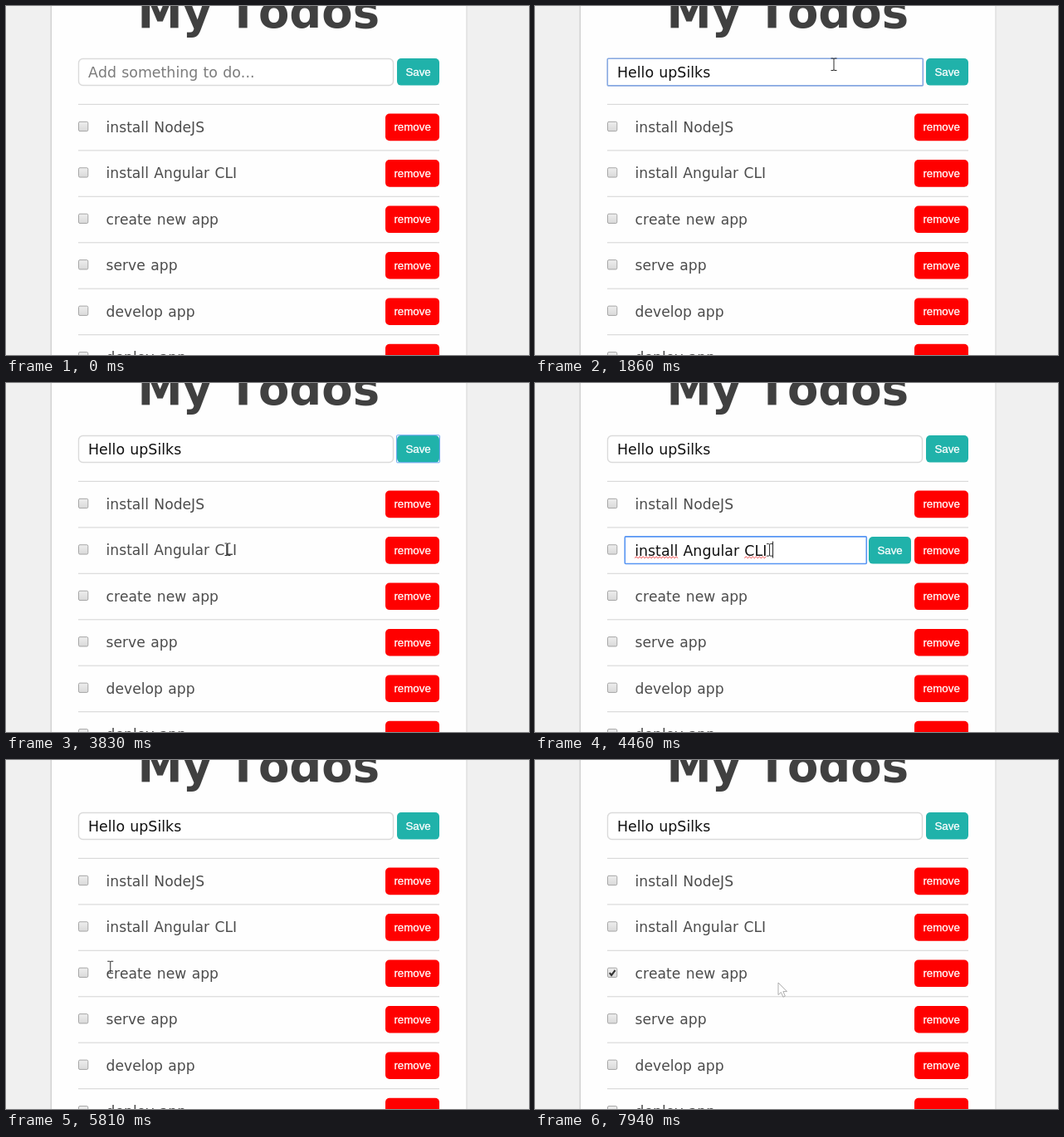
These frames come from a looping animation (630x420 px, 8 s). An HTML page:

```html
<!DOCTYPE html>
<html lang="en">
<head>
<meta charset="utf-8">
<title>My Todos</title>
<style>
  html, body { margin: 0; width: 100%; height: 100%; overflow: hidden; background: #f0f0f0; }
  svg { display: block; width: 630px; height: 420px; }
  text { white-space: pre; font: 17.4px "DejaVu Sans", sans-serif; word-spacing: .7px; font-kerning: none; }
  .title { font-size: 54.4px; font-weight: bold; word-spacing: 0; fill: #404040; }
  .item { font-size: 17.15px; word-spacing: 1px; fill: #4c4c4c; }
  .label { font: 13.33px "Liberation Sans", Arial, sans-serif; word-spacing: 0; fill: #fff; stroke: #fff; stroke-width: .3; }
  .value { fill: #111; }
  .hint { fill: #7c7c7c; }
  .squiggle { fill: none; stroke: #f03030; stroke-width: .9; }
</style>
</head>
<body>
<svg id="stage" viewBox="0 0 630 420"></svg>
<script>
const LOOP = 8000;
const ROW_TOP = 118, ROW_STEP = 55.45;
const ITEMS = ["install NodeJS", "install Angular CLI", "create new app", "serve app", "develop app", "deploy app"];
const GREETING = "Hello upSilks";
const CLICK = { input: 850, save: 2860, item: 3950, close: 5480, check: 6300 };

// time, x, y of the pointer
const PATH = [
  [20, 242, 302], [300, 290, 230], [740, 394, 70], [1000, 360, 70], [1950, 360, 70],
  [2460, 466, 74], [2640, 479, 70], [2860, 479, 70], [2920, 440, 120], [3080, 400, 390],
  [3330, 300, 205], [3600, 267, 200], [4300, 267, 200], [5030, 392, 205], [5230, 397, 218],
  [5400, 380, 224], [5910, 98, 252], [6080, 79, 246], [6240, 91, 256], [6360, 91, 256],
  [6700, 340, 294], [6860, 340, 294], [7200, 490, 308], [7450, 490, 308], [7640, 446, 299],
  [7940, 293, 268]
];

const stage = document.getElementById("stage");

function add(tag, attrs = {}, parent = stage, content = "") {
  const el = document.createElementNS(stage.namespaceURI, tag);
  for (const key in attrs) el.setAttribute(key, attrs[key]);
  el.textContent = content;
  parent.append(el);
  return el;
}
const rect = (x, y, width, height, attrs, parent) => add("rect", { x, y, width, height, ...attrs }, parent);
const label = (x, y, content, cls, parent = stage) => add("text", { x, y, class: cls }, parent, content);
const show = (el, on) => el.setAttribute("visibility", on ? "visible" : "hidden");
const inside = (p, b) => p.x > b.x && p.x < b.x + b.w && p.y > b.y && p.y < b.y + b.h;

const buttons = [];
function button(x, y, w, caption, color, parent = stage) {
  const face = rect(x, y, w, 32.6, { rx: 5, fill: color }, parent);
  label(x + 10.4, y + 20.8, caption, "label", parent);
  const item = { x, y, w, h: 32.6, face, color };
  buttons.push(item);
  return item;
}

function field(x, y, w, textX, ring, parent = stage) {
  const box = rect(x + .5, y + .5, w - 1, 32, { rx: 5, fill: "#fff", stroke: "#dadada", "stroke-width": 1.4 }, parent);
  const focus = rect(x + .3, y + .3, w, 32.6, { rx: 1, fill: "#fff", stroke: ring, "stroke-width": 1.6 }, parent);
  const value = label(textX, y + 23, "", "value", parent);
  const caret = rect(0, y + 6, 1, 20, { fill: "#222" }, parent);
  return { x, y, w, h: 32, textX, box, focus, value, caret, parent };
}

function squiggle(target, from, to) {
  const start = target.textX + (from ? target.value.getSubStringLength(0, from) : 0);
  const end = target.textX + target.value.getSubStringLength(0, to);
  const y = target.y + 25;
  let d = `M${start} ${y + 1}`;
  for (let x = start + 2, up = true; x <= end; x += 2, up = !up) d += `L${x} ${up ? y - .7 : y + 1.2}`;
  return add("path", { d, class: "squiggle" }, target.parent);
}

// Page
rect(0, 0, 630, 420, { fill: "#f0f0f0" });
rect(53, -10, 503, 440, { fill: "#e4e4e4" });
rect(54, -10, 501, 440, { fill: "#cfcfcf" });
rect(55, -10, 499.5, 440, { fill: "#fefefe" });
label(158.4, 26.2, "My Todos", "title");

const input = field(87, 63, 380, 99, "#86a8e2");
const hint = label(99, 86, "Add something to do...", "hint");
const save = button(471, 63, 51, "Save", "#20b2aa");
const saveRing = rect(470.6, 62.8, 51.8, 33, { rx: 1, fill: "none", stroke: "#5e9fee", "stroke-width": 1 });

const grad = add("linearGradient", { id: "shade", x2: 0, y2: 1 });
add("stop", { offset: 0, "stop-color": "#eee" }, grad);
add("stop", { offset: 1, "stop-color": "#d9d9d9" }, grad);

const words = ITEMS.map((name, i) => {
  const top = ROW_TOP + i * ROW_STEP;
  rect(87, top - .2, 435, 1.2, { fill: "#dadada" });
  rect(87.5, top + 21.3, 11.3, 11.3, { rx: 1.5, fill: "url(#shade)", stroke: "#a6a6a6" });
  const text = label(120.6, top + 34, name, "item");
  button(457, top + 11.6, 65, "remove", "#f00");
  return { x: 121, y: top + 18, w: text.getComputedTextLength(), h: 20 };
});
const tick = add("path", { d: "M89.8 256.2l2.3 2.8 4.5-6", fill: "none", stroke: "#333", "stroke-width": 2.1 });

const editor = add("g");
const edit = field(108, 184.6, 291, 120.2, "#5795f3", editor);
const editSave = button(402, 185, 51, "Save", "#20b2aa", editor);

// Spelling marks, measured on the full text
input.value.textContent = GREETING;
const greetingMark = squiggle(input, 6, GREETING.length);
edit.value.textContent = ITEMS[1];
const editMarks = [squiggle(edit, 0, 7), squiggle(edit, 16, 19)];

// Pointers, each with its hot spot at 0,0
const pointer = {
  arrow: add("path", {
    d: "M0 0V14.6L3.4 11.5L5.9 17.2L8.3 16.1L5.9 10.6H10.5Z",
    fill: "#fff", stroke: "#a4a4a4", "stroke-width": .9
  }),
  beam: add("path", {
    d: "M-3.5 -7H-1Q0 -7 0 -6Q0 -7 1 -7H3.5M0 -6V6.5M-3.5 7.5H-1Q0 7.5 0 6.5Q0 7.5 1 7.5H3.5",
    fill: "none", stroke: "#2b2b2b", "stroke-width": 1
  }),
  hand: add("path", {
    d: "M-1.5 .5Q0 -1.4 1.4 .5V6Q3 5 4 6.6Q5.6 5.8 6.6 7.4Q9 7 9 9.4V13Q9 15 7.6 16.6V19H-.8V17.2L-4.8 11.4Q-5.8 9.2 -3.6 9.2L-1.5 11Z",
    fill: "#fff", stroke: "#52606c", "stroke-width": .8
  })
};

function pointerAt(t) {
  const i = PATH.findIndex(step => step[0] > t);
  if (i < 1) {
    const [, x, y] = PATH[i ? PATH.length - 1 : 0];
    return { x, y };
  }
  const [t0, x0, y0] = PATH[i - 1], [t1, x1, y1] = PATH[i];
  const u = (t - t0) / (t1 - t0), e = u * u * (3 - 2 * u);
  return { x: x0 + (x1 - x0) * e, y: y0 + (y1 - y0) * e };
}

function setField(target, text, focused, caretOn) {
  if (target.value.textContent !== text) target.value.textContent = text;
  show(target.focus, focused);
  show(target.caret, focused && caretOn);
  target.caret.setAttribute("x", target.textX + (text ? target.value.getComputedTextLength() : 0) + .5);
}

function draw(t) {
  const typed = Math.max(0, Math.min(GREETING.length, Math.floor((t - 900) / 51)));
  const typing = t >= CLICK.input && t < CLICK.save;
  const editing = t >= CLICK.item && t < CLICK.close;
  const blink = (t + 700) % 1000 < 500;

  setField(input, GREETING.slice(0, typed), typing, t < 1570 || blink);
  show(hint, !typed);
  show(greetingMark, typing && t >= 2000);
  show(saveRing, t >= CLICK.save && t < CLICK.item);

  // Children carry their own visibility, so the whole group is toggled by display
  editor.setAttribute("display", editing ? "inline" : "none");
  if (editing) setField(edit, ITEMS[1] + (t >= 4650 ? " 7" : t >= 4400 ? " " : ""), true, blink);
  editMarks.forEach((mark, i) => show(mark, t >= (i ? 4450 : 4000)));
  show(tick, t >= CLICK.check);

  const p = pointerAt(t);
  const hovered = buttons.find(b => inside(p, b) && (b !== editSave || editing));
  for (const b of buttons) b.face.setAttribute("fill", b === hovered ? "#778899" : b.color);

  const overText = inside(p, input) || (editing && inside(p, edit)) || words.some(w => inside(p, w));
  const kind = hovered ? "hand" : overText ? "beam" : "arrow";
  for (const name in pointer) {
    show(pointer[name], t >= 20 && name === kind);
    pointer[name].setAttribute("transform", `translate(${p.x} ${p.y})`);
  }
}

const start = performance.now();
function frame() {
  draw((performance.now() - start) % LOOP);
  requestAnimationFrame(frame);
}
draw(0);
requestAnimationFrame(frame);
</script>
</body>
</html>
```
